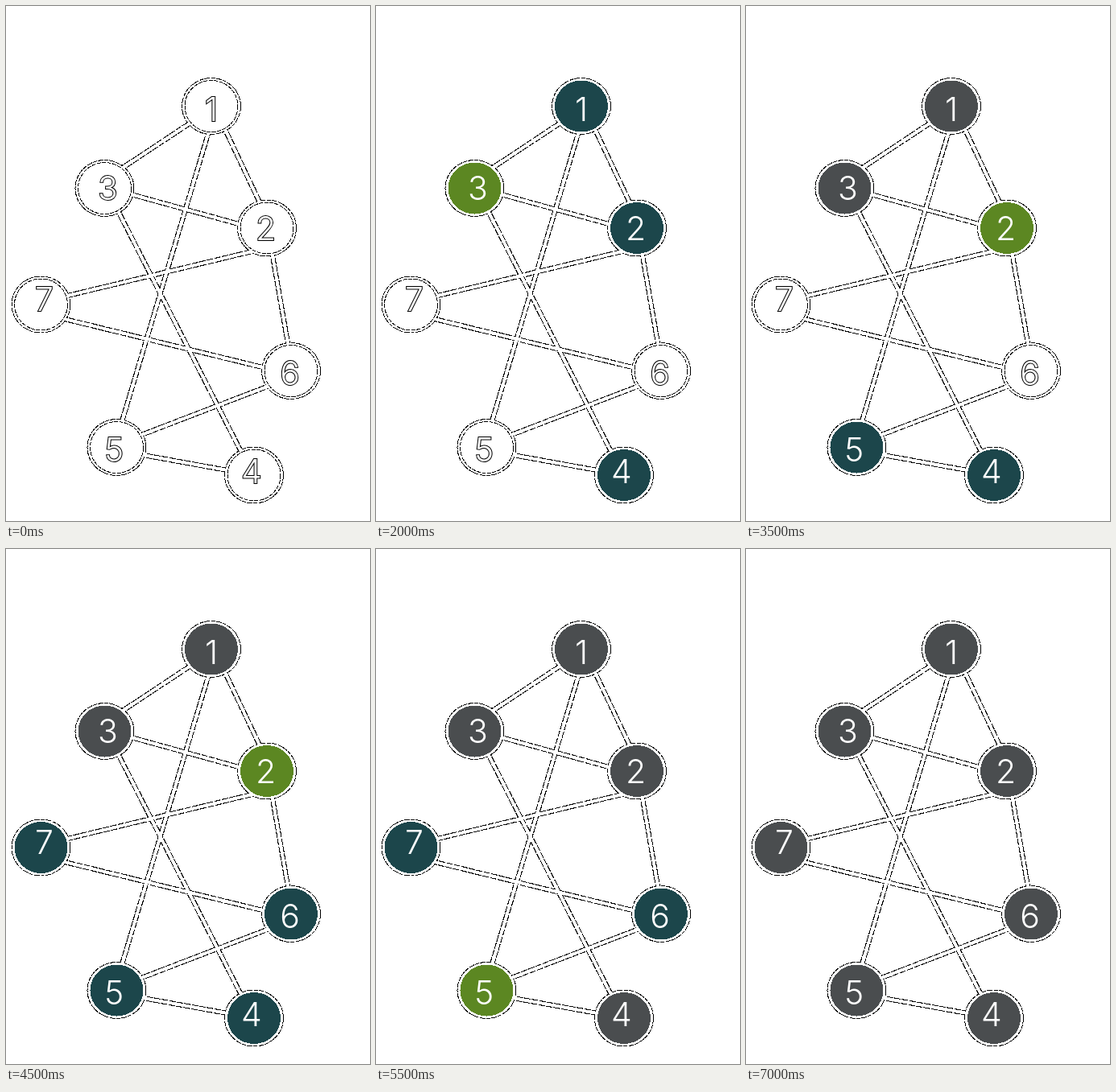
Recreate the animation shown at these times as an HTML page. Size 452 by 640 pixels, loop 7500 ms.

```html
<!DOCTYPE html>
<html lang="en">
<head>
<meta charset="utf-8">
<title>Breadth-first search</title>
<style>
  html, body { margin: 0; width: 100%; height: 100%; overflow: hidden; background: #fff; }
  svg { display: block; }
  line, ellipse { shape-rendering: crispEdges; }
  .rim { fill: none; stroke: #000; stroke-dasharray: 7 1.5 5 1; }
  .edge { stroke: #000; stroke-width: 6.2; stroke-dasharray: 8 1.5; }
  .core { stroke: #fff; stroke-width: 4; }
  .band { fill: #fff; }
  text { font: 300 41px Inter, Roboto, sans-serif; text-anchor: middle; fill: #fff; paint-order: stroke; }
  .new ellipse { fill: #fff; stroke: #000; stroke-dasharray: 5 1.5; }
  .new text { stroke: #000; stroke-width: 2; }
  .queued { fill: #1c464b; }
  .active { fill: #5c8722; }
  .done { fill: #4a4d4f; }
</style>
</head>
<body>
<svg id="stage" width="452" height="640" viewBox="0 0 452 640"></svg>
<script>
const stage = document.getElementById('stage');
const STEP = 500, ROOT = 3;

// Centre of each node and offset of its label
const nodes = [
  [255, 124.5, 0, 18.5], [324, 276, -1.5, 14.5], [122.5, 226.5, 4, 14.5], [308, 583, -3, 10],
  [137.5, 548.5, -3, 17.5], [354, 453.5, -1.5, 17], [43.5, 371, 4, 7.5]
].map(([x, y, dx, dy], i) => ({ id: i + 1, x, y, dx, dy, links: [] }));
const node = id => nodes[id - 1];

// Two node ids, and how far the line passes beside each centre
const edges = [
  [3, 1, -9, 3], [1, 2, -3, -5.5], [1, 5, -6, 3], [3, 2, -1.5, 4.5], [3, 4, -2, 1],
  [2, 7, -24, 3], [2, 6, -1, -2], [7, 6, 10.5, 4], [6, 5, -7.5, 3.5], [5, 4, 3.5, 0]
].map(([from, to, shiftA, shiftB]) => {
  const a = node(from), b = node(to);
  a.links.push(b);
  b.links.push(a);
  const length = Math.hypot(b.x - a.x, b.y - a.y);
  const nx = (a.y - b.y) / length, ny = (b.x - a.x) / length;
  return {
    x1: a.x + nx * shiftA, y1: a.y + ny * shiftA,
    x2: b.x + nx * shiftB, y2: b.y + ny * shiftB
  };
});

// Breadth-first search: one step per discovery and one per change of active node
function search() {
  const queue = [node(ROOT)];
  let step = 1;
  queue[0].queued = step;
  for (const current of queue) {
    current.active = step++;
    current.links.sort((a, b) => a.id - b.id);
    for (const next of current.links) {
      if (next.queued) continue;
      next.queued = step++;
      queue.push(next);
    }
    current.done = step;
  }
  return step + 1;
}
const steps = search();

function add(tag, attrs, parent = stage) {
  const el = document.createElementNS('http://www.w3.org/2000/svg', tag);
  for (const key in attrs) el.setAttribute(key, attrs[key]);
  return parent.appendChild(el);
}

const addEdges = name => edges.forEach(ends => add('line', { ...ends, class: name }));
const addDiscs = (name, rx, ry) => nodes.forEach(n =>
  add('ellipse', { cx: n.x, cy: n.y, rx, ry, class: name }));

// Outlines go below the white bands so that joints and crossings stay open
addEdges('edge');
addDiscs('rim', 36.5, 35);
addEdges('core');
addDiscs('band', 36, 34.5);

for (const n of nodes) {
  n.group = add('g', {});
  add('ellipse', { cx: n.x, cy: n.y, rx: 33, ry: 32 }, n.group);
  add('text', { x: n.x + n.dx, y: n.y + n.dy }, n.group).textContent = n.id;
}

const start = performance.now();
function draw() {
  const step = Math.floor((performance.now() - start) / STEP) % steps;
  for (const n of nodes) {
    const state = ['done', 'active', 'queued'].find(s => step >= n[s]) || 'new';
    n.group.setAttribute('class', state);
  }
  requestAnimationFrame(draw);
}
draw();
</script>
</body>
</html>
```
